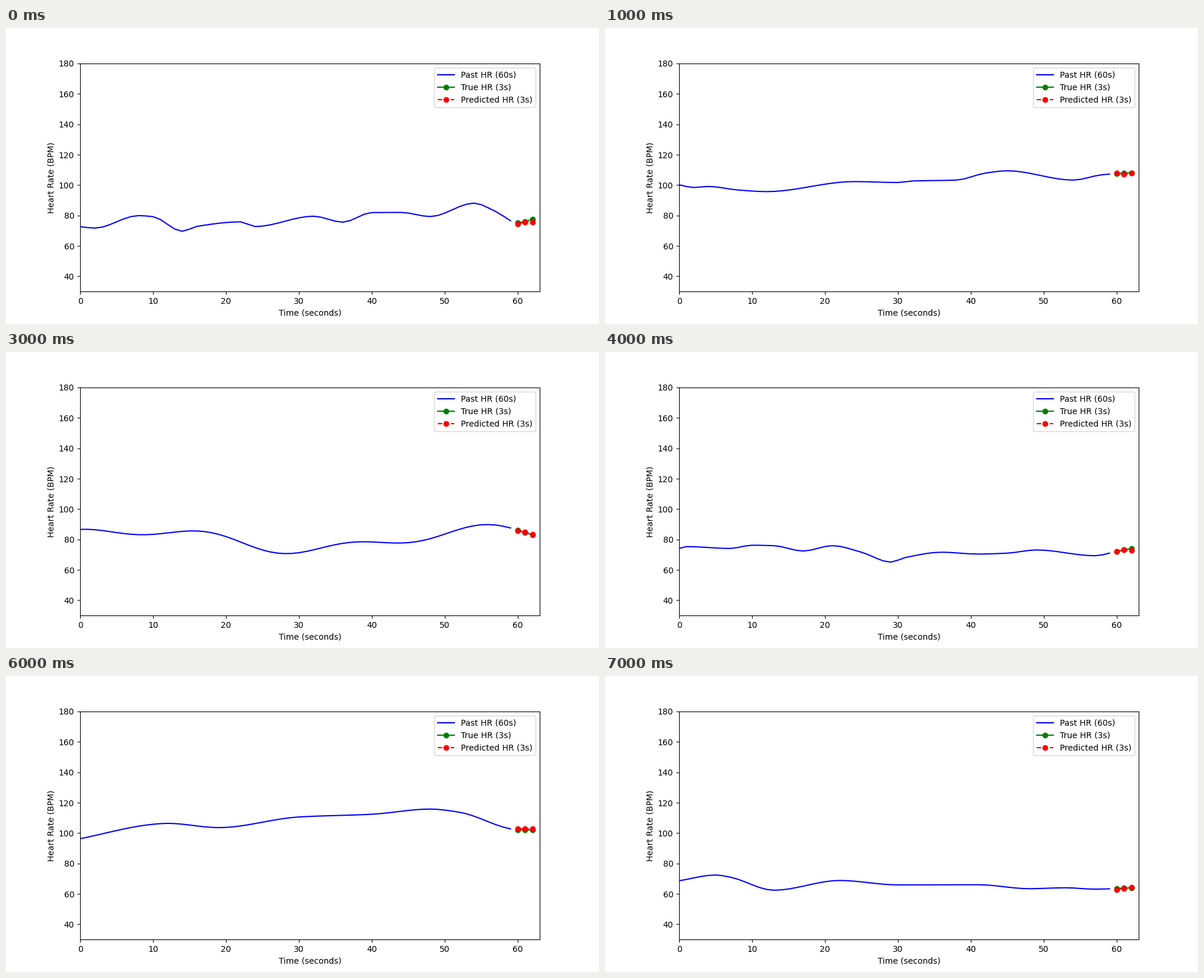
A matplotlib script for the animation above (8 s loop, 1000 by 500 pixels).

```python
import numpy as np
import matplotlib.pyplot as plt
from matplotlib.animation import FuncAnimation

PAST = 60
SECONDS = np.arange(PAST + 3)


def smooth(*points):
    """Monotone cubic curve through (second, bpm) turning points."""
    x, y = np.array(points, float).T
    step = np.diff(x)
    slope = np.diff(y) / step
    left, right = slope[:-1], slope[1:]
    same = left * right > 0
    tangent = np.zeros_like(y)
    tangent[[0, -1]] = slope[[0, -1]]
    tangent[1:-1][same] = (2 * left * right)[same] / (left + right)[same]

    i = np.clip(np.searchsorted(x, SECONDS, side="right") - 1, 0, len(step) - 1)
    h = step[i]
    t = (SECONDS - x[i]) / h
    ease = t * t * (3 - 2 * t)
    return (y[i] + (y[i + 1] - y[i]) * ease
            + h * t * (1 - t) * (tangent[i] * (1 - t) - tangent[i + 1] * t))


def waves(low, high, rates, phases):
    """Sum of two sines scaled to run from low to high."""
    wave = sum(np.sin(r * SECONDS + p) / (i + 1)
               for i, (r, p) in enumerate(zip(rates, phases)))
    return np.interp(wave, [wave.min(), wave.max()], [low, high])


# Each window: the heart rate curve and the errors of its three predictions.
windows = [
    (smooth((0, 72.6), (2, 71.7), (8, 79.9), (10, 79.2), (14, 69.6),
            (16, 72.8), (22, 75.8), (24, 72.7), (32, 79.5), (36, 75.6),
            (40, 81.9), (44, 82.0), (48, 79.3), (54, 88.1), (57, 82.5),
            (60, 75.1), (62, 77.5)),
     (-0.8, -0.4, -1.9)),
    (smooth((0, 100.2), (2, 98.4), (4, 99.1), (8, 96.8), (12, 95.7),
            (24, 102.3), (30, 101.7), (32, 102.7), (38, 103.3), (42, 107.9),
            (45, 109.4), (54, 103.3), (58, 106.8), (62, 108.1)),
     (0.3, -0.8, -0.2)),
    (smooth((0, 86.4), (5, 84.3), (9, 82.8), (15, 75.2), (21, 83.5),
            (29, 74.7), (31, 76.5), (33, 76.2), (39, 78.8), (45, 86.2),
            (49, 88.4), (53, 87.5), (59, 89.9), (62, 89.2)),
     (1.1, 0.8, 0.6)),
    (waves(70.7, 89.8, (0.13, 0.33), (0.6, 2.0)), (-0.5, 0.2, 0.6)),
    (smooth((0, 74.1), (1, 75.3), (7, 74.1), (10, 76.2), (13, 75.9),
            (17, 72.4), (21, 75.9), (25, 71.6), (29, 65.1), (31, 68.1),
            (36, 71.6), (41, 70.4), (45, 71.0), (49, 73.1), (57, 69.3),
            (60, 72.2), (62, 74.0)),
     (-0.2, 0, -1.1)),
    (waves(57.0, 71.0, (0.15, 0.36), (1.0, 0.5)), (0.5, 0.3, -0.4)),
    (smooth((0, 96.3), (10, 105.8), (12, 106.4), (19, 103.6), (30, 110.6),
            (40, 112.4), (48, 115.8), (52, 113.7), (60, 102.2), (62, 102.0)),
     (0.6, 0.7, 0.7)),
    (smooth((0, 68.6), (5, 72.4), (7, 71.0), (13, 62.4), (22, 68.8),
            (30, 65.9), (41, 66.0), (48, 63.4), (53, 64.0), (57, 63.1),
            (62, 64.0)),
     (-0.7, -0.4, 0.1)),
]

fig, ax = plt.subplots(figsize=(10, 5), dpi=100)
past_line, = ax.plot([], [], "b-", label="Past HR (60s)")
true_line, = ax.plot([], [], "go-", label="True HR (3s)")
predicted_line, = ax.plot([], [], "ro--", label="Predicted HR (3s)")
ax.set(xlim=(0, 63), ylim=(30, 180),
       xlabel="Time (seconds)", ylabel="Heart Rate (BPM)")
ax.legend(loc="upper right")


def update(index):
    rate, errors = windows[index]
    past_line.set_data(SECONDS[:PAST], rate[:PAST])
    true_line.set_data(SECONDS[PAST:], rate[PAST:])
    predicted_line.set_data(SECONDS[PAST:], rate[PAST:] + errors)
    return past_line, true_line, predicted_line


anim = FuncAnimation(fig, update, frames=len(windows), interval=1000,
                     repeat=True, repeat_delay=0)
plt.show()
```
